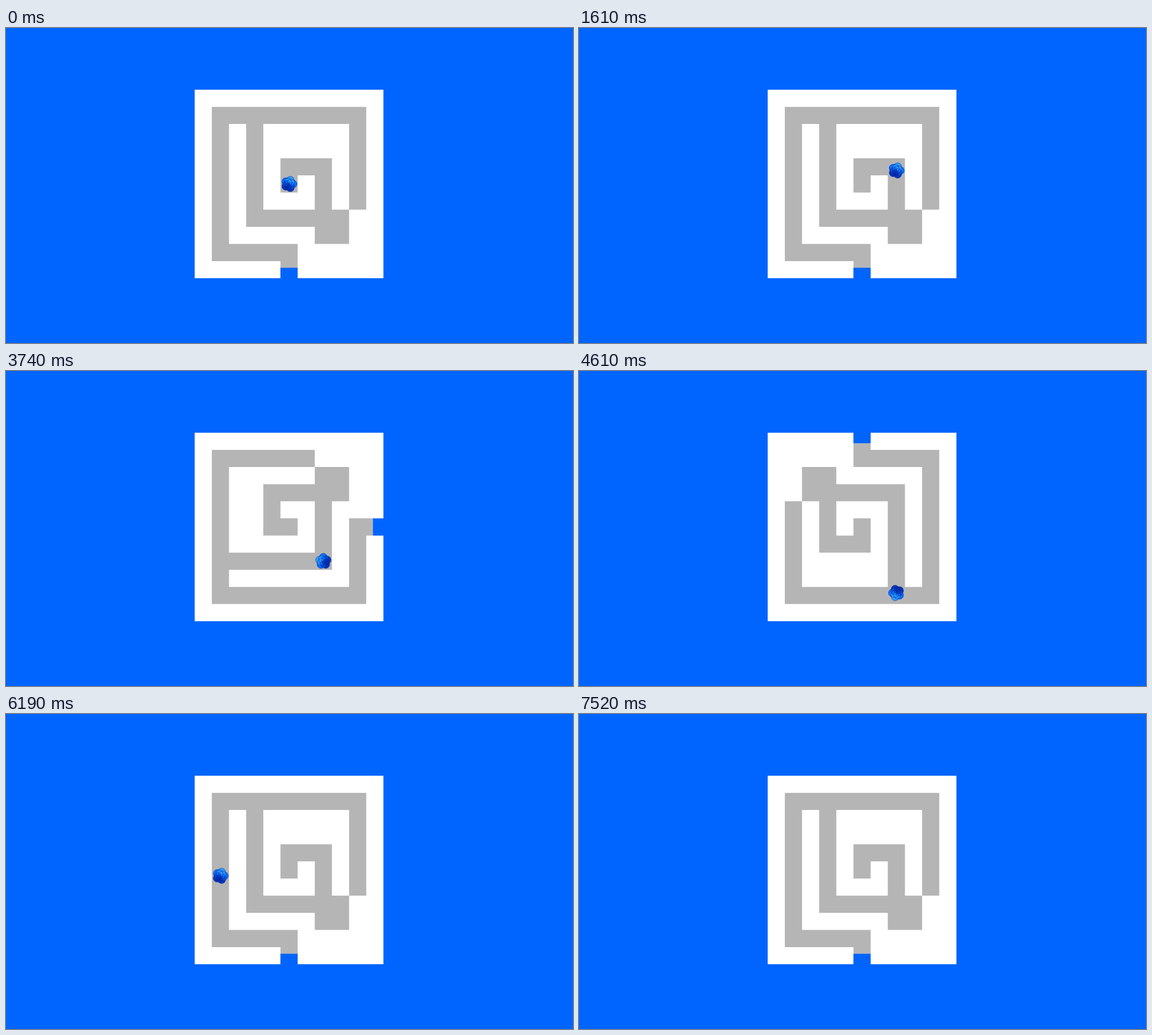
These frames come from a looping animation (1003x558 px, 8.05 s). An HTML page:

```html
<!DOCTYPE html>
<html lang="en">
<head>
<meta charset="utf-8">
<title>Maze</title>
<style>
  html, body { margin: 0; width: 100%; height: 100%; overflow: hidden; background: #0064ff; }
  svg { display: block; width: 100vw; height: 100vh; }
</style>
</head>
<body>
<svg viewBox="0 0 1003 558">
  <rect width="1003" height="558" fill="#0064ff"/>
  <g id="maze">
    <rect x="-.5" y="-.5" width="11" height="11" fill="#fff"/>
    <path id="paths" fill="none" stroke="#b5b5b5" stroke-linecap="square"/>
    <rect x="4.5" y="9.89" width="1" height=".65" fill="#0064ff"/>
    <g id="rose"></g>
  </g>
</svg>
<script>
const LOOP = 8050, TICK = 78.75, START = 520;
const CELL = 30.35, CENTER = "500.7 276.3";
const FALL = 0.0988;   // cells per tick squared
const BOUNCE = 0.2;    // speed kept after landing
const LAG = 0.7;       // ticks from a key press until the rose slides
const EXIT_ROW = 13.5;

// Corridors as corner cells
const corridors = [
  [[9, 6], [9, 1], [1, 1], [1, 9], [5, 9], [5, 10]],
  [[3, 1], [3, 7], [8, 7], [8, 8], [7, 8], [7, 4], [5, 4], [5, 5]]
];
// Ticks at which the player turns the maze by a quarter
const rightTurns = [-7, -0.67, 19.5, 27.33, 30.33, 56.67, 64.67, 73.9];
const leftTurns = [4.33, 11.83, 41, 80.67];

const $ = id => document.getElementById(id);
const maze = $("maze"), rose = $("rose");

const cells = new Set();
for (const line of corridors) {
  for (let i = 1; i < line.length; i++) {
    const [x0, y0] = line[i - 1], [x1, y1] = line[i];
    const n = Math.abs(x1 - x0) + Math.abs(y1 - y0);
    for (let j = 0; j <= n; j++) cells.add([x0 + (x1 - x0) * j / n, y0 + (y1 - y0) * j / n].join());
  }
}
const isOpen = (x, y) => cells.has([x, y].join()) || (x === 5 && y > 10 && y < 20);
$("paths").setAttribute("d", corridors.map(line => "M" + line.join("L")).join(""));

// Rings of round petals, lit from the top
function drawRose() {
  const disc = (x, y, r, fill) =>
    `<circle cx="${x}" cy="${y}" r="${r}" fill="${fill}" stroke="#0626a8" stroke-width=".6"/>`;
  let out = "";
  for (let ring = 0; ring < 4; ring++) {
    const size = 14 - ring * 3.2;
    for (let i = 0; i < 5; i++) {
      const a = (i * 2 + ring * 0.5) * Math.PI * 0.4;
      const light = Math.cos(a + 1.2);
      out += disc(size * 0.5 * Math.cos(a), size * 0.5 * Math.sin(a), size * 0.5,
        `hsl(${216 - 9 * light} 97% ${46 + 13 * light}%)`);
    }
  }
  rose.innerHTML = out + disc(0, 0, 1.6, "#0a3cc8");
}

// Each turn sends the rose along the new downward direction up to the next wall
function planMoves() {
  const turns = [...rightTurns.map(at => ({ at, dir: 1 })), ...leftTurns.map(at => ({ at, dir: -1 }))]
    .sort((a, b) => a.at - b.at);
  let quarter = 0, x = 5, y = 5;
  for (const turn of turns) {
    quarter += turn.dir;
    const dx = Math.round(Math.sin(quarter * Math.PI / 2));
    const dy = Math.round(Math.cos(quarter * Math.PI / 2));
    Object.assign(turn, { x, y, dx, dy, dist: 0 });
    while (isOpen(x + dx, y + dy)) {
      x += dx;
      y += dy;
      turn.dist++;
    }
  }
  return turns;
}
const turns = planMoves();

const tickAt = t => Math.floor((t - START) / TICK + 0.35);

function angleAt(k) {
  const steps = turns.map(({ at, dir }) => dir * Math.min(10, Math.max(0, (k - at) * 6)));
  return 9 * Math.round(steps.reduce((a, b) => a + b));
}

// Acceleration up to the wall, then one small hop
function fallen(time, dist) {
  const land = Math.sqrt(dist / FALL);
  if (time < land) return FALL * time * time;
  const hop = time - land, span = 2 * BOUNCE * land;
  return dist - FALL * hop * Math.max(0, span - hop);
}

function roseAt(k) {
  const move = turns.filter(turn => k >= turn.at + LAG).pop();
  if (!move) return [5, 5];
  const d = fallen(k - move.at - LAG, move.dist);
  return [move.x + move.dx * d, move.y + move.dy * d];
}

function draw(t) {
  const k = tickAt(t), [x, y] = roseAt(k);
  maze.setAttribute("transform",
    `translate(${CENTER}) rotate(${angleAt(k)}) scale(${CELL}) translate(-5 -5)`);
  rose.setAttribute("transform", `translate(${x} ${y}) scale(${1 / CELL})`);
  rose.setAttribute("visibility", y < EXIT_ROW ? "visible" : "hidden");
}

drawRose();
const begin = performance.now();
function loop() {
  draw((performance.now() - begin) % LOOP);
  requestAnimationFrame(loop);
}
draw(0);
requestAnimationFrame(loop);
</script>
</body>
</html>
```
